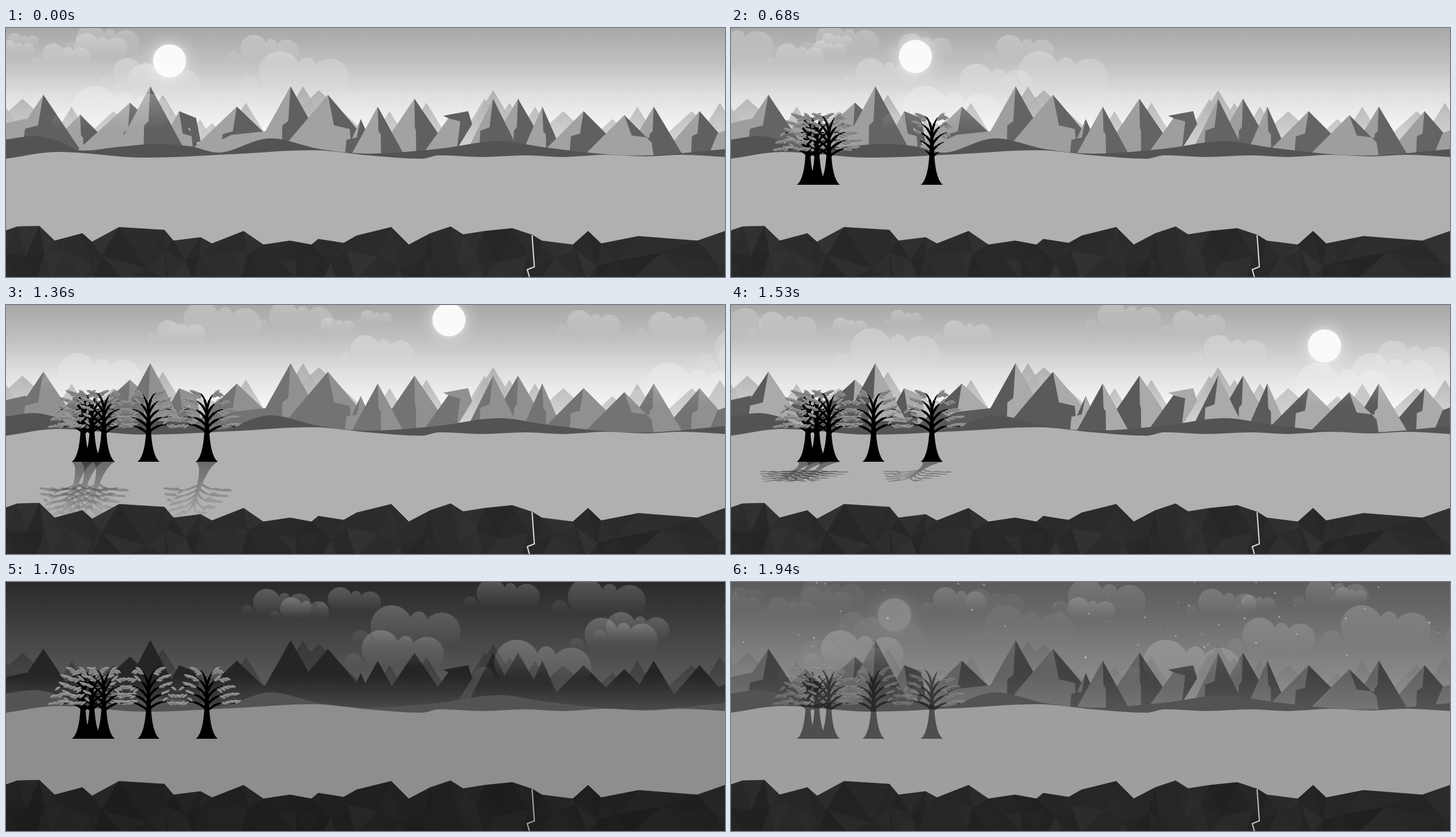
Animation, 1271 px wide and 440 px high, one loop 2.04 s. Source, as an HTML page:

```html
<!DOCTYPE html>
<html lang="en">
<head>
<meta charset="utf-8">
<title>Day and night</title>
<style>
html, body { margin: 0; width: 100%; height: 100%; overflow: hidden; background: #b0b0b0; }
svg { display: block; width: 1271px; height: 440px; }
</style>
</head>
<body>
<svg viewBox="0 0 1271 440">
  <defs>
    <linearGradient id="daySky" gradientUnits="userSpaceOnUse" x1="0" y1="0" x2="0" y2="190">
      <stop offset="0" stop-color="#a8a8a8"/><stop offset=".32" stop-color="#c0c0c0"/>
      <stop offset=".63" stop-color="#e0e0e0"/><stop offset="1" stop-color="#fafafa"/>
    </linearGradient>
    <linearGradient id="nightSky" gradientUnits="userSpaceOnUse" x1="0" y1="0" x2="0" y2="190">
      <stop offset="0" stop-color="#2a2a2a"/><stop offset="1" stop-color="#5e5e5e"/>
    </linearGradient>
    <linearGradient id="dayBack" gradientUnits="userSpaceOnUse" x1="0" y1="103" x2="0" y2="200">
      <stop offset="0" stop-color="#a6a6a6"/><stop offset="1" stop-color="#cecece"/>
    </linearGradient>
    <linearGradient id="nightBack" gradientUnits="userSpaceOnUse" x1="0" y1="103" x2="0" y2="200">
      <stop offset="0" stop-color="#343434"/><stop offset="1" stop-color="#4a4a4a"/>
    </linearGradient>
    <linearGradient id="mist" gradientUnits="userSpaceOnUse" x1="0" y1="165" x2="0" y2="226">
      <stop offset="0" stop-color="#505050" stop-opacity="0"/><stop offset="1" stop-color="#505050" stop-opacity=".85"/>
    </linearGradient>
    <linearGradient id="puff" gradientUnits="userSpaceOnUse" x1="0" y1="-1" x2="0" y2=".95">
      <stop offset="0" stop-color="#fff"/><stop offset="1" stop-color="#fff" stop-opacity="0"/>
    </linearGradient>
    <linearGradient id="leaf" x1="0" y1="0" x2="0" y2="1">
      <stop offset="0" stop-color="#a6a6a6"/><stop offset="1" stop-color="#6c6c6c"/>
    </linearGradient>
    <radialGradient id="glow">
      <stop offset=".45" stop-color="#fff" stop-opacity=".45"/><stop offset=".7" stop-color="#fff" stop-opacity=".12"/>
      <stop offset="1" stop-color="#fff" stop-opacity="0"/>
    </radialGradient>
    <linearGradient id="fade" gradientUnits="userSpaceOnUse" x1="0" y1="277" x2="0" y2="372">
      <stop offset="0" stop-color="#fff"/><stop offset="1" stop-color="#fff" stop-opacity=".15"/>
    </linearGradient>
    <mask id="fadeMask" maskUnits="userSpaceOnUse" x="0" y="270" width="1271" height="170">
      <rect y="270" width="1271" height="170" fill="url(#fade)"/>
    </mask>
  </defs>
  <g id="stage"></g>
</svg>
<script>
const W = 1271, H = 440, LOOP = 2040, WRAP = 1475, SHORE = 277, BASE = 226;
const stage = document.getElementById('stage');
const clamp = (v, a = 0, b = 1) => Math.min(b, Math.max(a, v));
const mix = (a, b, t) => a + (b - a) * t;
const grey = v => { const c = Math.round(v); return `rgb(${c},${c},${c})`; };
const pairs = text => text.split(' ').map(p => p.split(',').map(Number));
const poly = (pts, fill, extra = '') => `<polygon points="${pts}" fill="${fill}" ${extra}/>`;
const rect = (y, h, fill, extra = '') => `<rect y="${y}" width="${W}" height="${h}" fill="${fill}" ${extra}/>`;

function random(seed) {
  return () => (seed = (seed * 16807) % 2147483647) / 2147483647;
}

// Area below a smooth line through a few points
function land(line, fill) {
  const p = pairs(line);
  const slope = i => {
    const a = p[Math.max(0, i - 1)], b = p[Math.min(p.length - 1, i + 1)];
    return (b[1] - a[1]) / (b[0] - a[0]);
  };
  let d = `M${p[0]}`;
  for (let i = 1; i < p.length; i++) {
    const [x0, y0] = p[i - 1], [x1, y1] = p[i], w = (x1 - x0) / 3;
    d += `C${x0 + w},${y0 + slope(i - 1) * w} ${x1 - w},${y1 - slope(i) * w} ${x1},${y1}`;
  }
  return `<path d="${d}V${H}H0Z" fill="${fill}"/>`;
}

const hills = land('0,197 50,191 90,199 130,216 200,210 265,205 325,209 380,220 465,195 555,214 640,222 760,214 '
  + '870,200 960,212 1060,223 1140,225 1271,214', '#535353');
const lake = fill => land('0,231 90,219 240,229 400,223 545,216 640,225 735,231 765,225 840,228 920,225 985,228 '
  + '1060,224 1130,227 1195,224 1271,228', fill);

// Distant summits
const steep = pairs('0,140 116,139 277,118 343,161 424,132 525,103 678,147 743,132 846,125 861,110 890,132 '
  + '935,139 1116,139 1262,132');
const broad = pairs('29,125 190,147 364,168 553,110 985,147 1072,161 1212,147');

// Near summits, back to front: x, y, half width per unit of height, offset of the foot of the ridge
const summits = [
  [131, 153, 1, 6], [66, 118, .67, -38], [219, 132, 1.1, -12], [306, 147, .55, 25], [255, 103, .54, -12],
  [408, 139, 1.05, -28], [503, 103, .56, -16], [569, 118, .85, 43], [627, 161, .45, -28],
  [722, 125, .68, 3], [657, 139, .55, 6], [905, 125, .58, -8], [861, 125, .5, -25], [948, 139, .44, 7],
  [1021, 147, 1, -25], [1226, 147, .87, -15], [1145, 139, .6, -8], [1093, 154, 1, 52]];

const triangle = k => ([x, y]) => [x, y, x + k * (BASE - y), BASE, x - k * (BASE - y), BASE];

function mountains(back, left, right) {
  const far = k => list => list.map(p => poly(triangle(k)(p), back, 'opacity=".85"')).join('');
  const near = summits.map(([x, y, k, jag]) => {
    const outline = triangle(k)([x, y]);
    const ridge = [x + jag, BASE, x + jag * .9, mix(y, BASE, .56), x + jag * .25, mix(y, BASE, .5)];
    return poly(outline, left) + poly([...outline.slice(0, 4), ...ridge], right);
  }).join('');
  return far(1.1)(broad) + far(.62)(steep) + near
    + poly('306,147 336,159 344,200 331,205 325,178 312,170', right)
    + poly('783,158 737,222 797,214 804,160', left)
    + poly('773,155 817,147 824,170 797,214 803,165 783,160', right)
    + poly('0,168 36,160 28,222 0,222', left)
    + poly('372,202 398,189 462,182 482,222 370,222', left)
    + poly('1271,181 1258,186 1243,222 1271,222', left);
}

// Clouds: top, radius, starting x, drift per unit of sun travel
const clouds = [
  [41, 37, 484, 1.63], [102, 40, 157, 5.04], [53, 26, 215, .85], [63, 30, 245, 5.1], [27, 20, 84, .41],
  [9, 22, 142, 4.75], [-6, 26, 150, .69], [9, 13, 15, 4.25], [22, 14, 5, 4.13], [12, 24, 438, 1.46],
  [-6, 32, -180, 4.05], [85, 34, -266, 3.78]];

const disc = (x, y, r) => `M${x - r},${y}a${r},${r} 0 1 1 ${2 * r},0a${r},${r} 0 1 1 ${-2 * r},0`;
const cloudPath = disc(0, 0, 1) + disc(1.3, -.3, .4) + disc(2.4, .25, .9) + disc(-1.45, .65, .45)
  + 'M0,-.1H2.4V.95H-1.450V.7H0Z';

function cloudLayer(travel, opacity) {
  return clouds.map(([top, r, start, drift]) => {
    const x = start + drift * travel;
    const wrapped = x - WRAP * Math.max(0, Math.floor((x + 125) / WRAP));
    return `<path d="${cloudPath}" fill="url(#puff)" opacity="${opacity}"
      transform="translate(${wrapped},${top + r}) scale(${r})"/>`;
  }).join('');
}

const stars = (() => {
  const rnd = random(77);
  let s = '';
  for (let i = 0; i < 55; i++) {
    const x = rnd() * W, y = rnd() * 135, r = .5 + rnd() * .8;
    s += `<circle cx="${x}" cy="${y}" r="${r * 2}" fill="#fff" opacity=".18"/>`
      + `<circle cx="${x}" cy="${y}" r="${r}" fill="#fff" opacity=".5"/>`;
  }
  return s;
})();

const crest = pairs('0,358 20,351 59,350 86,376 135,363 152,378 200,352 280,357 296,376 344,370 364,381 420,359 '
  + '455,383 502,376 540,383 552,373 597,380 620,367 681,352 712,383 750,363 786,351 808,365 846,359 895,354 '
  + '931,366 947,376 1002,383 1029,359 1052,381 1118,368 1222,376 1271,359');
const ground = (fill, extra) => poly([...crest, W, H, 0, H], fill, extra);

const rocks = (() => {
  const rnd = random(2024);
  const mid = crest.map(([x], i) => {
    const next = crest[i + 1] || [W + 40];
    return [(x + next[0]) / 2 + rnd() * 24 - 12, 392 + rnd() * 34];
  });
  const low = crest.map(([x]) => [x + rnd() * 30 - 15, 446]);
  const facet = (...pts) => {
    const c = grey(37 + rnd() * 13);
    return poly(pts.join(' '), c, `stroke="${c}" stroke-width=".5"`);
  };
  let s = ground('#2b2b2b');
  for (let i = 0; i < crest.length - 1; i++) {
    s += facet(crest[i], crest[i + 1], mid[i]) + facet(mid[i], crest[i + 1], mid[i + 1])
      + facet(mid[i], mid[i + 1], low[i + 1]) + facet(mid[i], low[i], low[i + 1]);
  }
  return s + '<path d="M930,366L934,422L921.500,427L925.500,441" fill="none" stroke="#d8d8d8" stroke-width="2.200"/>';
})();

// Five pairs of branches, from wide and low to narrow and high
const branches = [];
for (let level = 0; level < 5; level++) {
  for (const side of [-1, 1]) {
    const t = level / 4, y = -50 - 42 * t + side * 1.5, reach = side * (50 - 31 * t ** 1.5);
    branches.push({
      from: [0, y], bend: [reach * (.45 - .2 * t), y - 22 - 8 * t], to: [reach, -62 - 60 * t],
      sprout: .1 + .33 * (1 - t), side
    });
  }
}
const trunk = '<path d="M-19.500,0Q-6,-10 -4,-60L-1.500,-100H1.500L4,-60Q6,-10 19.500,0Z"/>';

function tree(growth, leafFill) {
  let wood = trunk, leaves = '';
  branches.forEach(({ from, bend, to, sprout, side }, i) => {
    const grown = clamp((growth - sprout) / .35);
    if (!grown) return;
    [[4.2, .45], [2.8, .75], [1.6, 1]].forEach(([width, part]) => {
      wood += `<path d="M${from}Q${bend} ${to}" pathLength="1" fill="none" stroke="#000" stroke-width="${width}"
        stroke-dasharray="${grown * part} 2"/>`;
    });
    for (let j = 0; j < 5; j++) {
      const t = .52 + j * .12;
      if (grown < t) continue;
      const [x, y] = [0, 1].map(a => mix(mix(from[a], bend[a], t), mix(bend[a], to[a], t), t));
      const turn = (i * 47 + j * 71) % 80 - 35;
      leaves += `<path d="M0,0Q5,-6 13,-1Q7,4 0,0" fill="${leafFill}"
        transform="translate(${x},${y}) scale(${side},1) rotate(${turn})"/>`;
    }
  });
  return wood + leaves;
}

// x, first step of growth, facing, step at which the shadow shows
const trees = [[136, 0, 1, 10.7], [152, .4, -1, 10.7], [173, .8, 1, 12], [355, 3, 1, 12], [252, 9, -1, LOOP]];
const growthAt = (start, step) => clamp((step - start) / 9.5);

function grove(step) {
  return trees.map(([x, start, facing]) => {
    const g = growthAt(start, step), s = clamp(g / .45);
    return s ? `<g transform="translate(${x},${SHORE}) scale(${s * facing},${s})">${tree(g, 'url(#leaf)')}</g>` : '';
  }).join('');
}

function shadows(step, turn, sunY) {
  const lean = .4 * Math.cos(turn * Math.PI * 1.1), length = 20 / sunY;
  const s = trees.map(([x, start, facing, from]) => {
    const opacity = clamp((step - from) / 4) * .4;
    return opacity ? `<g opacity="${opacity}" transform="matrix(${facing},0,${-lean},${-length},${x},${SHORE})">
      ${tree(growthAt(start, step), '#000')}</g>` : '';
  }).join('');
  return `<g mask="url(#fadeMask)">${s}</g>`;
}

// The sun creeps up at first, then time races
const travelAt = step => step < 15 ? 37 * (step / 8) ** 1.45 : 494 + 133 * (step - 16);

function dayScene(step) {
  const travel = travelAt(step), turn = travel / 767;
  const x = 289 + travel, y = 19.6 + 3.137e-4 * (x - 639) ** 2;
  return rect(0, 240, 'url(#daySky)')
    + `<circle cx="${x}" cy="${y}" r="54" fill="url(#glow)"/><circle cx="${x}" cy="${y}" r="29.300" fill="#fafafa"/>`
    + mountains('url(#dayBack)', grey(162 - 73 * turn), grey(96 + 75 * turn))
    + cloudLayer(travel, .27) + hills + lake('#b0b0b0') + shadows(step, turn, y);
}

const nightRange = mountains('url(#nightBack)', '#252525', '#252525');

function nightScene(step) {
  const held = clamp(step, 20, 22), depth = (held - 20) / 2;
  return rect(0, 240, 'url(#nightSky)') + rect(0, 240, '#000', `opacity="${.6 * depth}"`)
    + `<g opacity="${depth}">${stars}</g>` + nightRange + rect(165, 65, 'url(#mist)')
    + cloudLayer(travelAt(held), .23) + hills + lake('#8e8e8e');
}

function render(step) {
  const dawn = step === 23;
  const night = step < 19 ? 0 : step === 19 || dawn ? .5 : 1;
  stage.innerHTML = (night < 1 ? dayScene(dawn ? 0 : Math.min(step, 18)) : '')
    + (night ? `<g opacity="${night}">${nightScene(step)}</g>` : '')
    + `<g opacity="${dawn ? .5 : 1}">${grove(step)}</g>`
    + rocks + ground('#000', `opacity="${.25 * night}"`);
}

// Steps alternate between 70 and 100 ms
let shown = -1;
const begin = performance.now();
function tick() {
  const t = (performance.now() - begin) % LOOP;
  const step = 2 * Math.floor(t / 170) + (t % 170 >= 70 ? 1 : 0);
  if (step !== shown) render(shown = step);
  requestAnimationFrame(tick);
}
tick();
</script>
</body>
</html>
```
